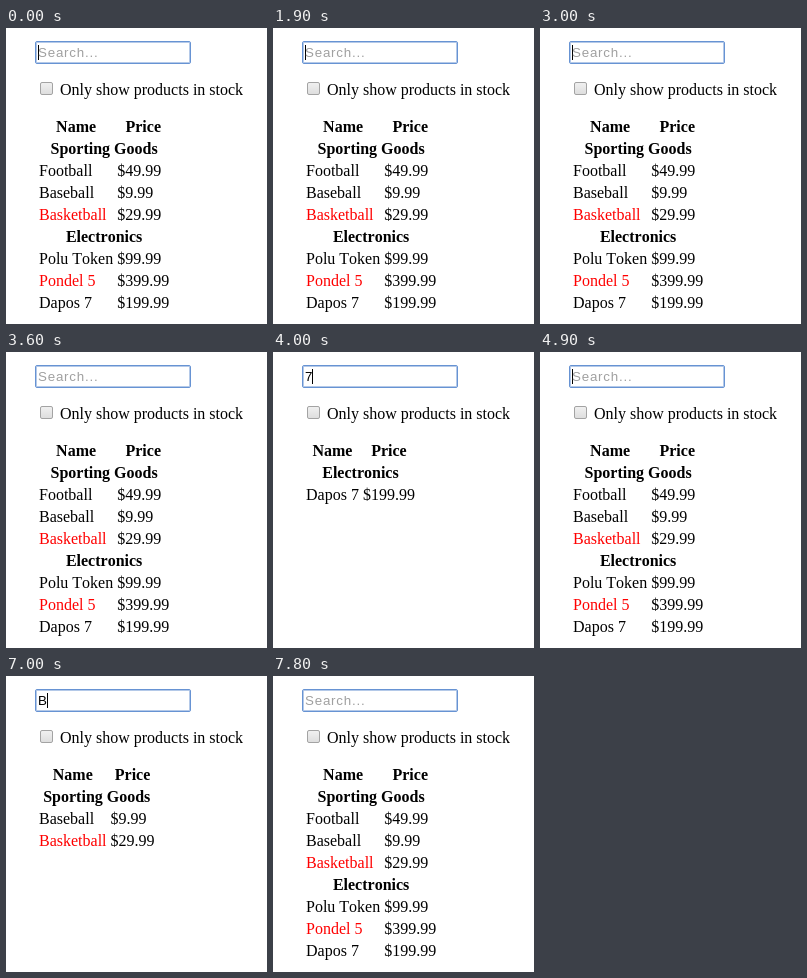
These frames come from a looping animation (261 px wide and 296 px high, 8 s). An HTML page:

```html
<!DOCTYPE html>
<html lang="en">
<head>
<meta charset="utf-8">
<title>Filterable product table</title>
<style>
html, body { margin: 0; width: 100%; height: 100%; overflow: hidden; background: #fff; }
body { position: relative; font: 16px/19px "Liberation Serif", "Times New Roman", serif; font-kerning: none; color: #000; }
body > * { position: absolute; box-sizing: border-box; white-space: pre; }
#field {
  left: 29px; top: 13px; width: 156px; height: 23px; padding: 3px 2px;
  border: 1px solid #6793d3; border-radius: 2px; box-shadow: inset 0 0 0 1px #b4c9e8;
  font: 13.333px/15px "Liberation Sans", Arial, sans-serif;
}
#caret { display: inline-block; width: 1px; height: 15px; margin-right: -1px; vertical-align: top; background: #000; }
#hint { color: #a0a0a0; letter-spacing: .8px; }
#box {
  left: 34px; top: 54px; width: 13px; height: 13px;
  border: 1px solid #a3a3a3; border-radius: 2px; background: linear-gradient(#f0f0f0, #dedede);
}
#label { left: 54px; top: 52px; }
table { left: 30px; top: 87px; border-spacing: 2px; }
th, td { padding: 0 1px 1px; }
.out { color: red; }
</style>
</head>
<body>
<div id="field"><span id="typed"></span><span id="caret"></span><span id="hint">Search...</span></div>
<div id="box"></div>
<div id="label">Only show products in stock</div>
<table></table>
<script>
const LOOP = 8000, BLINK = 600;
const groups = {
  "Sporting Goods": [["Football", "$49.99"], ["Baseball", "$9.99"], ["Basketball", "$29.99", "out"]],
  "Electronics": [["Polu Token", "$99.99"], ["Pondel 5", "$399.99", "out"], ["Dapos 7", "$199.99"]]
};
// Time of each edit, the query, and how long the field lags behind the table
const edits = [[-500, "", 0], [2000, "5", 0], [3000, "", 0], [4000, "7", 0],
  [4900, "", 0], [5800, "B", 100], [7200, "", 0]];

const $ = s => document.querySelector(s);
const typed = $("#typed"), caret = $("#caret"), hint = $("#hint"), table = $("table");
let shown = null;

function showTable(query) {
  if (query === shown) return;
  shown = query;
  let html = "<tr><th>Name</th><th>Price</th></tr>";
  for (const [title, items] of Object.entries(groups)) {
    const hits = items.filter(([name]) => name.includes(query));
    if (hits.length) html += `<tr><th colspan="2">${title}</th></tr>`;
    for (const [name, price, stock = ""] of hits)
      html += `<tr><td class="${stock}">${name}</td><td>${price}</td></tr>`;
  }
  table.innerHTML = html;
}

function draw(now) {
  const t = now % LOOP;
  showTable(edits.findLast(([at]) => t >= at)[1]);
  const [start, text] = edits.findLast(([at, , lag]) => t >= at + lag);
  typed.textContent = text;
  hint.hidden = text !== "";
  caret.style.visibility = Math.floor((t - start) / BLINK) % 2 ? "hidden" : "visible";
}

const t0 = performance.now();
function tick() {
  draw(performance.now() - t0);
  requestAnimationFrame(tick);
}
tick();
</script>
</body>
</html>
```
